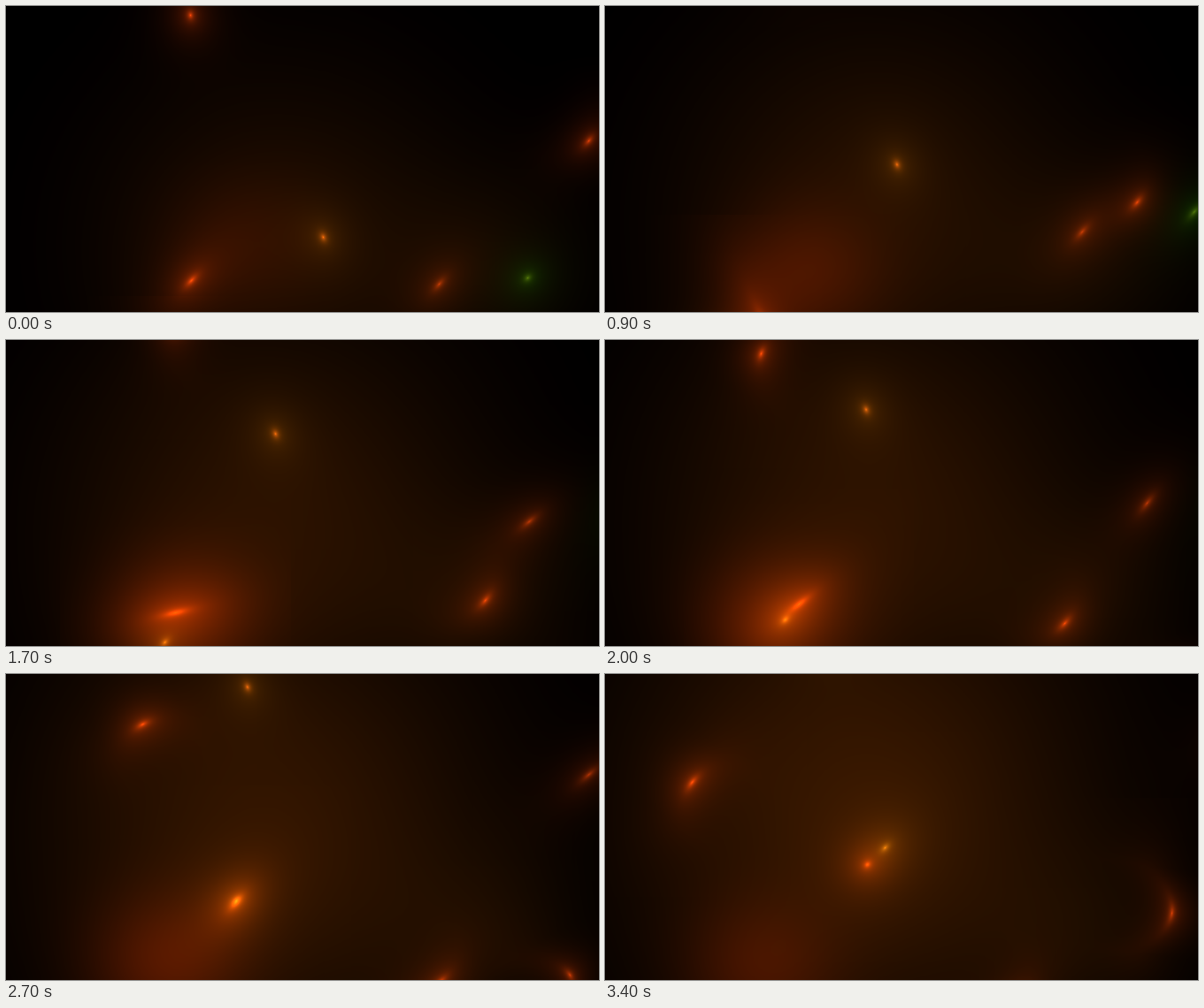
An HTML page with a canvas for the animation above (3500 ms loop, 670 by 346 pixels).

```html
<!DOCTYPE html>
<html lang="en">
<head>
<meta charset="utf-8">
<title>Drifting embers</title>
<style>
  html, body { margin: 0; width: 100%; height: 100%; overflow: hidden; background: #000; }
  canvas { display: block; }
</style>
</head>
<body>
<canvas id="stage" width="670" height="346"></canvas>
<script>
const W = 670, H = 346, LOOP = 3500, STEP = 100, REACH = 130;
const ctx = document.getElementById('stage').getContext('2d');
const img = ctx.createImageData(W, H);
const light = new Float32Array(W * H * 3);

const tints = {
  red:   { core: [170, 50, 9],  halo: [84, 22, 0], size: 19 },
  amber: { core: [180, 75, 14], halo: [42, 25, 0], size: 22 },
  gold:  { core: [135, 85, 15], halo: [48, 28, 0], size: 25 },
  green: { core: [70, 78, 13],  halo: [4, 40, 0],  size: 19 }
};

// each path is a few [time, x, y] points joined by a smooth curve;
// stretch runs from its first value to its second over that time
const sparks = [
  { tint: 'amber', stretch: [1.4, 1.4], path: [[0, 358, 261], [2900, 266, -4]] },
  { tint: 'red', stretch: [2.3, 2.3], path: [[0, 209, 310], [600, 160, 362]] },
  { tint: 'red', stretch: [5, 1.2],
    path: [[1000, 178, 356], [1350, 162, 320], [2000, 219, 298], [3400, 296, 215]] },
  { tint: 'gold', stretch: [1.5, 1.6], path: [[1600, 171, 350], [3400, 316, 196]] },
  { tint: 'red', stretch: [1.4, 1.4], path: [[0, 208, 10], [400, 204, -35]] },
  { tint: 'red', stretch: [1.8, 2.4], bend: -0.005,
    path: [[1700, 192, -18], [2000, 176, 15], [2400, 170, 45], [2900, 140, 67], [3400, 98, 122]] },
  { tint: 'red', stretch: [2.2, 3], dim: 0.7,
    path: [[0, 489, 314], [1300, 562, 229], [2000, 612, 184], [2400, 631, 140], [3000, 688, 88]] },
  { tint: 'red', stretch: [2, 2.4], bend: 0.004, dim: 0.9,
    path: [[0, 658, 152], [1300, 574, 254], [2000, 519, 320], [2900, 483, 354]] },
  { tint: 'green', stretch: [1.3, 3], path: [[0, 589, 307], [500, 639, 262], [1500, 700, 190]] },
  { tint: 'red', stretch: [1.4, 3.2], bend: -0.013, dim: 0.8,
    path: [[2400, 648, 356], [2900, 632, 326], [3400, 640, 270]] }
];

const mix = (a, b, k) => a + (b - a) * k;

function slope(path, i, n) {
  const a = path[Math.max(0, i - 1)], b = path[Math.min(path.length - 1, i + 1)];
  return (b[n] - a[n]) / (b[0] - a[0]);
}

// cubic between points, straight on beyond both ends
function along(path, t, n) {
  const end = path.length - 1;
  if (t <= path[0][0]) return path[0][n] + slope(path, 0, n) * (t - path[0][0]);
  if (t >= path[end][0]) return path[end][n] + slope(path, end, n) * (t - path[end][0]);
  const i = path.findIndex(p => p[0] > t) - 1;
  const a = path[i], b = path[i + 1], span = b[0] - a[0];
  const k = (t - a[0]) / span, s = k * k * (3 - 2 * k);
  return mix(a[n], b[n], s)
    + span * k * (1 - k) * ((1 - k) * slope(path, i, n) - k * slope(path, i + 1, n));
}

function bell(n, c, s) {
  return Float32Array.from({ length: n }, (_, i) => Math.exp(-0.5 * ((i - c) / s) ** 2));
}

function cloud(x, y, sx, sy, r, g) {
  const gx = bell(W, x, sx), gy = bell(H, y, sy);
  for (let j = 0, p = 0; j < H; j++) {
    for (let i = 0; i < W; i++, p += 3) {
      const v = gx[i] * gy[j];
      light[p] += r * v;
      light[p + 1] += g * v;
    }
  }
}

function spark({ tint, stretch, path, bend = 0, dim = 1 }, t) {
  const { core, halo, size } = tints[tint];
  const x = along(path, t, 1), y = along(path, t, 2);
  const angle = Math.atan2(along(path, t + 1, 2) - along(path, t - 1, 2),
                           along(path, t + 1, 1) - along(path, t - 1, 1));
  const c = Math.cos(angle), n = Math.sin(angle);
  const first = path[0][0], last = path[path.length - 1][0];
  const long = mix(...stretch, Math.max(0, Math.min(1, (t - first) / (last - first))));
  const wide = 1 + (long - 1) * 0.4;
  const x0 = Math.max(0, Math.floor(x - REACH)), x1 = Math.min(W, x + REACH);
  const y0 = Math.max(0, Math.floor(y - REACH)), y1 = Math.min(H, y + REACH);
  for (let j = y0; j < y1; j++) {
    for (let i = x0; i < x1; i++) {
      const dx = i - x, dy = j - y;
      const u = dx * c + dy * n;
      const v = dy * c - dx * n - bend * Math.min(u * u, 2500);
      const soft = dim * Math.exp(-Math.sqrt((u / wide) ** 2 + v * v) / size);
      const hot = dim * Math.exp(-Math.sqrt((u / long) ** 2 + v * v) / 2.6);
      const p = (j * W + i) * 3;
      for (let k = 0; k < 3; k++) light[p + k] += core[k] * hot + halo[k] * soft;
    }
  }
}

function draw(t) {
  const u = t / 3400;
  light.fill(-2);
  const haze = mix(31, 57, u);
  cloud(mix(310, 285, u), mix(270, 150, u), mix(150, 185, u), mix(150, 200, u), haze, haze * 0.44);
  cloud(540, 290, 85, 75, 13, 7);
  const bed = 20 + 40 * Math.sin(2.5 * u);
  cloud(175 + 90 * (1 - u) ** 2, 270 + 65 * Math.sqrt(u), 60, 55, bed, bed * 0.22);
  for (const s of sparks) spark(s, t);

  const px = img.data;
  for (let p = 0, q = 0; q < px.length; p += 3, q += 4) {
    px[q] = light[p];
    px[q + 1] = light[p + 1];
    px[q + 2] = light[p + 2];
    px[q + 3] = 255;
  }
  ctx.putImageData(img, 0, 0);
}

const start = performance.now();
let shown = -1;
function tick() {
  const t = Math.floor(((performance.now() - start) % LOOP) / STEP) * STEP;
  if (t !== shown) draw(shown = t);
  requestAnimationFrame(tick);
}
tick();
</script>
</body>
</html>
```
